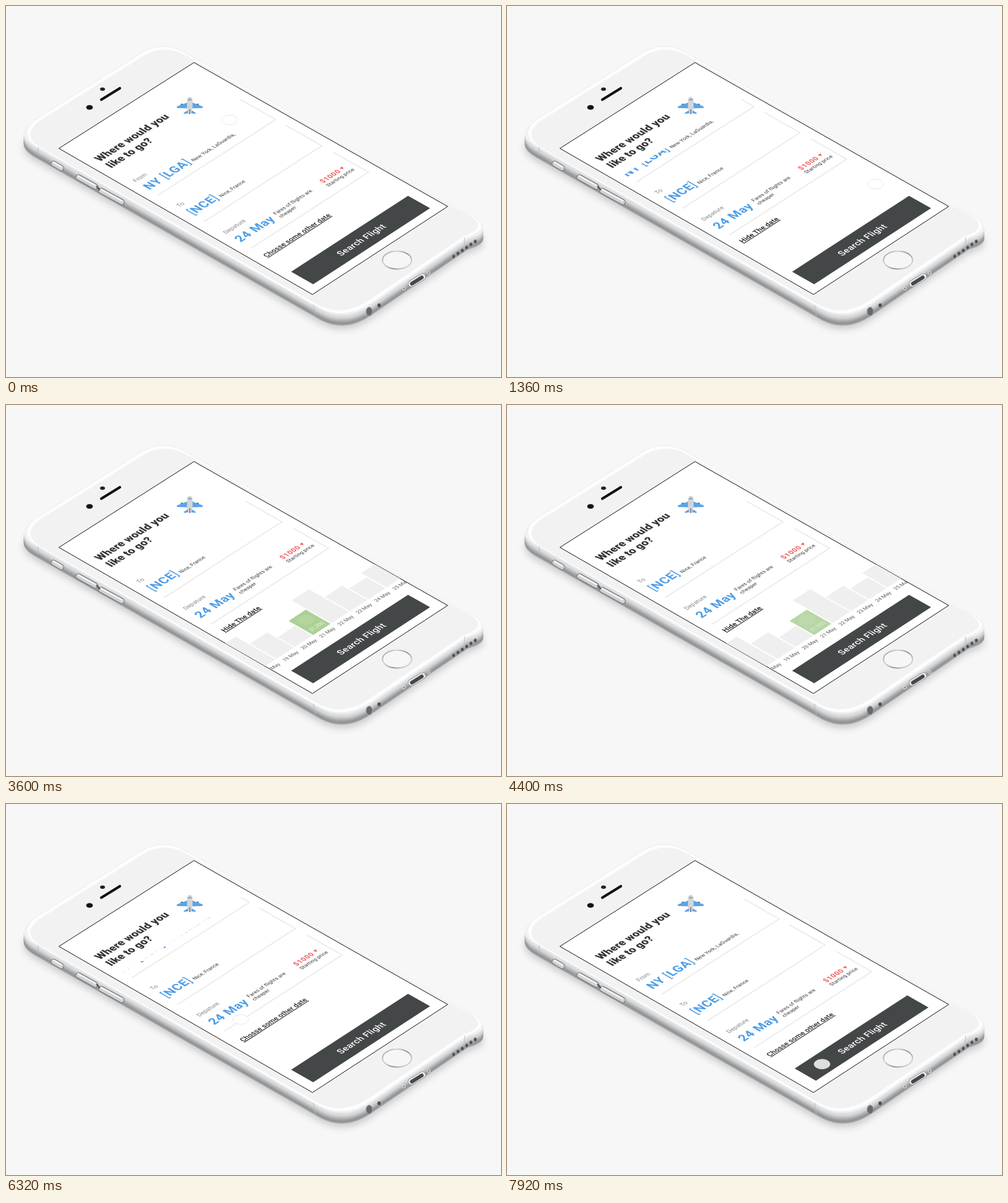
An HTML page for the animation above (8 s loop, 800 by 600 pixels).

```html
<!DOCTYPE html>
<html lang="en">
<head>
<meta charset="utf-8">
<title>Flight search</title>
<style>
  html, body { margin: 0; width: 100%; height: 100%; overflow: hidden; background: #f7f7f7; }
  svg { display: block; width: 800px; height: 600px; }
  text { font-family: Roboto, "Open Sans", sans-serif; white-space: pre; }
</style>
</head>
<body>
<svg id="stage" viewBox="0 0 800 600" xmlns="http://www.w3.org/2000/svg">
  <defs>
    <path id="face" d="M47 184L220 75Q255 55 291 76L741 332Q795 358 745 375L588 482Q545 510 505 488L50 228Q18 207 47 184Z"/>
    <path id="shell" d="M46 185L220 75Q255 55 291 76L741 332Q799 360 746 375L589 482Q546 511 505 487L49 227Q10 205 46 185Z"/>
    <filter id="soft" x="-10%" y="-10%" width="120%" height="130%"><feGaussianBlur stdDeviation="6"/></filter>
    <linearGradient id="ring" x1="0" y1="0" x2="1" y2="0.6">
      <stop offset="0" stop-color="#8c8e90"/><stop offset=".35" stop-color="#d6d6d6"/>
      <stop offset=".7" stop-color="#8a8c8e"/><stop offset="1" stop-color="#d0d0d0"/>
    </linearGradient>
    <clipPath id="listClip"><polygon id="listArea"/></clipPath>
    <clipPath id="chartClip"><polygon id="chartArea"/></clipPath>
  </defs>
  <rect width="800" height="600" fill="#f7f7f7"/>

  <use href="#shell" y="25" fill="#777" opacity=".35" filter="url(#soft)"/>
  <g id="body"></g>
  <use href="#face" fill="#fdfdfd" stroke="#e6e7e8" stroke-width=".8"/>
  <use href="#face" transform="translate(400 280) scale(.983 .975) translate(-400 -280)" fill="#f2f2f2"/>

  <g stroke-linecap="round" fill="none">
    <g stroke="#6c6f72" stroke-width="9.5"><path d="M77 255L89 262M117 277L144 292M154 299L187 317"/></g>
    <g stroke="#cfd1d3" stroke-width="7.5"><path d="M77 255L89 262M117 277L144 292M154 299L187 317"/></g>
    <g stroke="#f4f4f5" stroke-width="2.500"><path d="M77 253L89 260M117 275L144 290M154 297L187 315"/></g>
    <path d="M147 292L151 297" stroke="#555" stroke-width="2.500"/>
    <path d="M154 151.500L184 133" stroke="#111" stroke-width="4.200"/>
    <path d="M655 449L673 438" stroke="#8b8d90" stroke-width="11"/>
    <path d="M655 449L673 438" stroke="#e9eaeb" stroke-width="9.500"/>
    <path d="M656 449L672 439" stroke="#45474b" stroke-width="6"/>
    <path d="M497 484L500 500M52 229L52 240M741 375L741 392" stroke="#b9bbbd" stroke-width="2" opacity=".5"/>
  </g>
  <g id="holes" fill="#4a4c50">
    <ellipse cx="587" cy="494" rx="5" ry="7" fill="#66686c" stroke="#96989a"/>
    <ellipse cx="603" cy="484" rx="2.600" ry="3"/>
    <circle cx="643" cy="457" r="2.400" fill="#909295" stroke="#eee"/>
    <circle cx="683" cy="432" r="2.400" fill="#909295" stroke="#eee"/>
  </g>
  <ellipse cx="135" cy="164" rx="5.400" ry="3.800" fill="#111"/>
  <ellipse cx="156" cy="134.500" rx="4" ry="2.800" fill="#222"/>
  <ellipse cx="632" cy="411" rx="23.500" ry="14.500" fill="#f6f6f6" stroke="url(#ring)" stroke-width="2"/>

  <polygon points="85.500,230.300 303.800,91.400 713.800,324.200 495.300,466.600" fill="#fff" stroke="#111"/>
  <g id="header"></g>
  <g transform="translate(297 161)">
    <path d="M-14.500 -3H-11V0H-14.500ZM11 -3H14.500V0H11Z" fill="#5c6a78"/>
    <path d="M-4 -5L-21 1.500L-20.500 4L-3 4.500ZM4 -5L21 1.500L20.500 4L3 4.500Z" fill="#5ba3ea"/>
    <path d="M-2 7L-10 12L-9 13.500L0 12L9 13.500L10 12L2 7Z" fill="#5ba3ea"/>
    <path d="M-4.500 -9Q-4 -14 0 -14Q4 -14 4.500 -9V4L2.500 12H-2.500L-4.500 4Z" fill="#d3d6d9"/>
    <path d="M-3 -9.500Q0 -12.500 3 -9.500L2.500 -8Q0 -9.500 -2.500 -8Z" fill="#8e9aa5"/>
    <path d="M-.8 6H.8V14H-.8Z" fill="#8b6f6b"/>
  </g>
  <g clip-path="url(#listClip)"><g id="list"></g><g id="links"></g></g>
  <g id="chart" clip-path="url(#chartClip)"></g>
  <polygon id="button" fill="#434747"/>
  <g id="caption"></g>
  <g id="cursor"><circle r="15.300" fill="#fff" fill-opacity=".82" stroke="#e2e2e2" stroke-width="1"/></g>
</svg>
<script>
const NS = 'http://www.w3.org/2000/svg';
const LOOP = 8000;
const BLUE = '#4d9de6', DARK = '#333638', RED = '#f25a58', BAR = [239, 239, 239], GREEN = [172, 209, 149];
const $ = id => document.getElementById(id);

// Screen units (375 x 667) to the tilted stage; the slope grows slightly towards the bottom edge.
const A = .5813, C = .6132, D = .3523;
const slope = v => -.371 - .0075 * v / 667;
const point = (u, v) => [86 + A * u + C * v, 231 + slope(v) * u + D * v];
const matrix = (u, v) => `matrix(${[A, slope(v), C, D, ...point(u, v)].join(' ')})`;
const box = (u1, v1, u2, v2) => [[u1, v1], [u2, v1], [u2, v2], [u1, v2]].map(p => point(...p).join()).join(' ');

function add(parent, tag, attrs) {
  const el = document.createElementNS(NS, tag);
  for (const key in attrs) el.setAttribute(key, attrs[key]);
  return parent.appendChild(el);
}

function text(parent, str, u, v, size, fill, more = {}) {
  const el = add(parent, 'text', { transform: matrix(u, v), 'font-size': size, fill, ...more });
  el.textContent = str;
  return el;
}

const bold = ls => ({ 'font-weight': 700, 'letter-spacing': ls });
const small = { 'letter-spacing': .18 };

// Phone sides: the shell stacked downwards through a ramp of greys.
const ramp = [[0, 250], [3, 224], [7, 212], [12, 172], [16, 142], [19, 165]];
for (let y = 19; y > 0; y--) {
  const i = ramp.findIndex(r => r[0] >= y), [y0, c0] = ramp[i - 1], [y1, c1] = ramp[i];
  const c = Math.round(c0 + (c1 - c0) * (y - y0) / (y1 - y0));
  add($('body'), 'use', { href: '#shell', y, fill: `rgb(${c},${c + 2},${c + 4})` });
}
for (let i = 0; i < 6; i++) {
  add($('holes'), 'ellipse', { cx: 723.5 + i * 7, cy: 405 - i * 4.8, rx: 2.7, ry: 3.2, stroke: '#a5a7aa' });
}

$('listArea').setAttribute('points', box(0, 145, 375, 586));
$('chartArea').setAttribute('points', box(0, 400, 375, 580));

const title = { 'font-weight': 900, 'letter-spacing': .2 };
text($('header'), 'Where would you', 24, 85, 24.8, DARK, title);
text($('header'), 'like to go?', 24, 114.5, 24.8, DARK, title);
text($('caption'), 'Search Flight', 187, 626, 20.5, '#fff',
  { 'font-weight': 500, 'letter-spacing': .5, 'text-anchor': 'middle' });

const list = $('list');
function card(top, bottom, label, labelV, value, valueV) {
  const corners = [[24, bottom], [351, bottom], [351, top]].map(p => point(...p).join());
  add(list, 'polyline', { points: corners.join(' '), fill: 'none', stroke: '#e9e9e9', 'stroke-width': 1.6 });
  text(list, label, 24, labelV, 14, '#858789');
  const el = text(list, '', 24, valueV, 28, BLUE, bold(1));
  for (const part of value.split(/([[\]])/)) {
    const span = add(el, 'tspan', /[[\]]/.test(part) ? { 'font-weight': 400 } : {});
    span.textContent = part;
  }
}
card(145, 238, 'From', 179.5, 'NY [LGA]', 215);
card(265, 359.5, 'To', 294, '[NCE]', 331);
card(389, 482.5, 'Depature', 417, '24 May', 455.5);
text(list, 'New York, LaGuardia,', 147.5, 215, 12, DARK, small);
text(list, 'Nice, France', 102, 331, 12, DARK, small);
text(list, 'Fares of flights are', 132.5, 445, 12, DARK, small);
text(list, 'cheaper', 132.5, 459, 12, DARK, small);
text(list, '$1000', 266.5, 443, 16, RED, bold(1));
add(list, 'path', { d: 'M-4 -3.5H4L0 3.5Z', fill: RED, transform: matrix(326, 437) });
text(list, 'Starting price', 265.5, 458, 12, DARK, small);

const link = { 'font-weight': 500, 'letter-spacing': .25, 'text-decoration': 'underline' };
const openLink = text($('links'), 'Chosse some other date', 24, 524, 16, '#222', link);
const hideLink = text($('links'), 'Hide The date', 24, 518, 16, '#111', link);

const BASE = 543, PITCH = 51, PICKED = 3;
const bars = [105, 70, 45, 65, 105, 66, 50, 67].map((height, i) => ({
  height,
  u: -19.5 + i * PITCH,
  shape: add($('chart'), 'polygon', {}),
  label: text($('chart'), `${18 + i} May`, 0, 0, 12, '#55585a', { 'text-anchor': 'middle' })
}));
const price = text($('chart'), '$1,300', 157.5, 533, 12, '#eef6e8', { 'text-anchor': 'middle' });

const clamp = x => Math.min(1, Math.max(0, x));
const span = (t, from, to) => clamp((t - from) / (to - from));
const smooth = x => x * x * (3 - 2 * x);
const out = (x, power = 3) => 1 - (1 - x) ** power;
const mix = (a, b, k) => a + (b - a) * k;

// Each move: start, end, destination u, v, easing.
const moves = [
  [0, 880, 113.5, 522, smooth],
  [880, 1760, 341, 516.5, x => out(x, 4)],
  [1960, 2880, 158, 500, smooth],
  [4800, 5600, 72, 410, out],
  [6700, 7400, 75, 619, smooth]
];
function cursorAt(t) {
  let u = 290, v = 174;
  for (const [from, to, du, dv, ease] of moves) {
    const k = ease(span(t, from, to));
    u = mix(u, du, k);
    v = mix(v, dv, k);
  }
  return [u, v];
}

function render(t) {
  const scroll = -105.5 * smooth(span(t, 880, 1760)) + 111.5 * out(span(t, 6240, 7120), 4);
  list.setAttribute('transform', `translate(${C * scroll} ${D * scroll})`);

  const hiding = t >= 920 && t < 6280;
  openLink.style.display = hiding ? 'none' : '';
  hideLink.style.display = hiding ? '' : 'none';
  const openV = t < 3000 ? 524.5 + scroll : mix(412, 530, out(span(t, 6240, 6720)));
  openLink.setAttribute('transform', matrix(24, openV));
  hideLink.setAttribute('transform', matrix(24, 518.5 + scroll));

  const grow = span(t, 1800, 2200) ** 3 * (1 - smooth(span(t, 5680, 6160)));
  const drag = 44 * (1 - out(span(t, 2000, 2660)));
  const labels = span(t, 2000, 2200) * (1 - span(t, 5520, 5760));
  const picked = span(t, 3400, 3600) * (1 - span(t, 4320, 4760));
  $('chart').style.display = grow > 0 ? '' : 'none';
  bars.forEach((bar, i) => {
    const u = bar.u + drag;
    const tint = BAR.map((c, n) => Math.round(mix(c, GREEN[n], i === PICKED ? picked : 0)));
    bar.shape.setAttribute('points', box(u, BASE - bar.height * grow, u + 48, BASE));
    bar.shape.setAttribute('fill', `rgb(${tint})`);
    bar.label.setAttribute('transform', matrix(u + 24, 561));
    bar.label.setAttribute('opacity', labels);
  });
  price.setAttribute('opacity', picked);

  const scale = 1 + .05 * smooth(span(t, 7160, 7400)) - .087 * smooth(span(t, 7560, 7900));
  const w = 162.5 * scale, h = 29 * scale;
  $('button').setAttribute('points', box(186 - w, 618 - h, 186 + w, 618 + h));

  $('cursor').setAttribute('transform', matrix(...cursorAt(t)));
  $('cursor').setAttribute('opacity', 1 - .9 * span(t, 3360, 3520) * (1 - span(t, 4700, 4900)));
}

const start = performance.now();
function tick(now) {
  render(Math.max(0, now - start) % LOOP);
  requestAnimationFrame(tick);
}
render(0);
requestAnimationFrame(tick);
</script>
</body>
</html>
```
